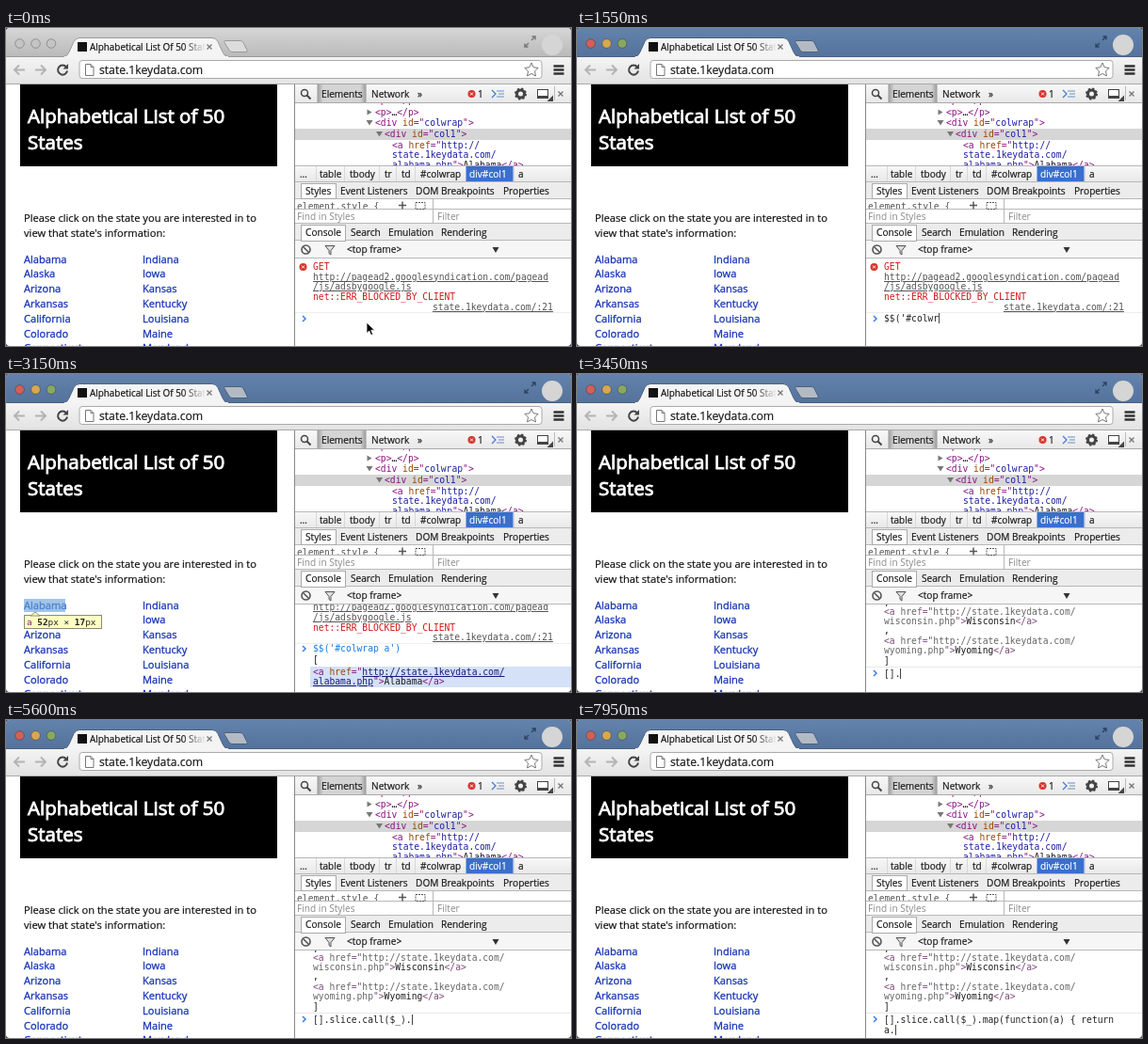
These frames come from a looping animation (600 px wide and 338 px high, 8000 ms). An HTML page:

```html
<!DOCTYPE html>
<html lang="en">
<head>
<meta charset="utf-8">
<title>Console typing</title>
<style>
html, body { margin: 0; width: 100%; height: 100%; overflow: hidden; background: #444; }
#stage {
  --strip1: #d6d6d6; --strip2: #b9b9b9; --bar1: #f4f4f4; --bar2: #e4e4e4; --edge: #999;
  --red: #c4c4c4; --yellow: #c4c4c4; --green: #c4c4c4; --newtab: #dcdcdc; --arrows: #777;
  position: absolute; left: 0; top: 0; width: 600px; height: 338px;
  overflow: hidden; border-radius: 4px; background: #fff;
  font: 10.15px "Open Sans", "Noto Sans", sans-serif; color: #1a1a1a;
  -webkit-text-stroke: .2px;
}
#stage.active {
  --strip1: #6383ad; --strip2: #54729a; --bar1: #f4f4f4; --bar2: #e2e2e2; --edge: #4a617f;
  --red: #d0605a; --yellow: #d6a850; --green: #88a862; --newtab: #b4bac4; --arrows: #2d4260;
}
svg { position: absolute; left: 0; top: 0; }
.txt { position: absolute; line-height: 20px; white-space: pre; }
.url { font-size: 12.2px; }
.title { font-size: 9.9px; width: 123px; overflow: hidden; color: #111;
  -webkit-mask-image: linear-gradient(90deg, #000 80%, transparent);
  mask-image: linear-gradient(90deg, #000 80%, transparent); }
.head { font-size: 20.5px; color: #fff; -webkit-text-stroke: .9px #fff; }
.para { font-size: 11.15px; color: #111; }
.link { font-size: 11.1px; color: #1634b4; -webkit-text-stroke-width: .3px; }
.crumb { font-size: 10px; }
.white { color: #fff; }
.hint { color: #8a8a8a; -webkit-text-stroke-width: 0; }
.mono, .tip { font: 9.66px/20px "DejaVu Sans Mono", "Liberation Mono", monospace; -webkit-text-stroke-width: 0; }
.tip { font-size: 9.4px; color: #222; }
.clip { position: absolute; left: 307px; width: 293px; overflow: hidden; }
.layer { position: absolute; left: -307px; width: 600px; height: 338px; }
.err { color: #d01818; }
.src { color: #555; text-decoration: underline; }
.cmd { color: #1a78e0; }
.grey { color: #555; }
.t { color: #881280; }
.n { color: #994500; }
.v { color: #1f1fa4; }
#last .t { color: #7a4a78; }
#last .n, #last .v { color: #666; }
.hover .v { color: #1a1a7a; text-decoration: underline; }
.row { position: absolute; background: #d4e1f7; }
#input { white-space: pre-wrap; width: 252px; line-height: 11px; left: 326px; color: #222; }
#caret { border-left: 1px solid #444; margin: 0 -1px 0 0; }
</style>
</head>
<body>
<div id="stage">
  <svg id="back" width="600" height="338">
    <defs>
      <linearGradient id="strip" x2="0" y2="1"><stop style="stop-color:var(--strip1)"/><stop offset="1" style="stop-color:var(--strip2)"/></linearGradient>
      <linearGradient id="bar" x2="0" y2="1"><stop style="stop-color:var(--bar1)"/><stop offset="1" style="stop-color:var(--bar2)"/></linearGradient>
      <linearGradient id="tool" x2="0" y2="1"><stop stop-color="#f8f8f8"/><stop offset="1" stop-color="#e8e8e8"/></linearGradient>
      <linearGradient id="picked"><stop stop-color="#999"/><stop offset=".12" stop-color="#d4d4d4"/><stop offset=".88" stop-color="#d4d4d4"/><stop offset="1" stop-color="#999"/></linearGradient>
    </defs>

    <!-- window frame -->
    <rect width="600" height="31" fill="url(#strip)"/>
    <circle cx="14.500" cy="16.500" r="4.800" style="fill:var(--red)" stroke="#0004"/>
    <circle cx="31.500" cy="16.500" r="4.800" style="fill:var(--yellow)" stroke="#0004"/>
    <circle cx="48" cy="16.500" r="4.800" style="fill:var(--green)" stroke="#0004"/>
    <path d="M233 13.500h16q2 0 3 2l4 8q1 2-1 2h-15q-2 0-3-2l-5-8q-1-2 1-2z" style="fill:var(--newtab);stroke:var(--edge)"/>
    <rect y="30" width="600" height="30" fill="url(#bar)"/>
    <path d="M0 30.500H61q4 0 6-5l5-11q2-4 6-4h141q4 0 6 4l5 11q2 5 6 5H600" style="fill:var(--bar1);stroke:var(--edge)"/>
    <rect x="62" y="30" width="174" height="2" style="fill:var(--bar1)"/>
    <rect x="76" y="15" width="10" height="10" fill="#111"/>
    <path d="M213.500 17.500l5 5m0-5l-5 5" stroke="#777" stroke-width="1.300"/>
    <path d="M558 13l4-4m-3.500 0h3.500v3.500M555 16l-4 4m0-3.500v3.500h3.500" fill="none" style="stroke:var(--arrows)" stroke-width="1.400"/>
    <circle cx="580" cy="18" r="11" fill="#d5d5d5"/>

    <!-- address bar -->
    <rect y="59" width="600" height="1" fill="#aaa"/>
    <path d="M20 44.500H9m5-5l-5 5 5 5M31 44.500h11m-5-5l5 5-5 5" fill="none" stroke="#b4b4b4" stroke-width="2"/>
    <path d="M64 41.500a5 5 0 1 0 1 4" fill="none" stroke="#444" stroke-width="2"/>
    <path d="M66 38v5.500h-5.500z" fill="#444"/>
    <rect x="78" y="34.500" width="491" height="19" rx="3" fill="#fff" stroke="#aaa"/>
    <path d="M84.500 38.500h5.500l3 3v9h-8.500zM90 38.500v3h3" fill="#fff" stroke="#777"/>
    <path d="M558 37l2.200 4.800 5 .600-3.700 3.500 1 5.100-4.500-2.500-4.500 2.500 1-5.100-3.700-3.500 5-.600z" fill="#fff" stroke="#777"/>
    <path d="M581.500 40.500h11m-11 4h11m-11 4h11" stroke="#333" stroke-width="2.300"/>

    <!-- page -->
    <rect x="15" y="60" width="273" height="87"/>

    <!-- inspector -->
    <rect x="306" y="60" width="1" height="278" fill="#888"/>
    <rect x="307" y="60" width="293" height="19" fill="url(#tool)"/>
    <rect x="330.500" y="60" width="52" height="19" fill="url(#picked)"/>
    <rect x="307" y="79" width="293" height="1" fill="#aaa"/>
    <circle cx="317" cy="69" r="3.500" fill="none" stroke="#444" stroke-width="1.500"/>
    <path d="M319.500 71.500l4 4" stroke="#444" stroke-width="2"/>
    <circle cx="494.500" cy="70" r="4" fill="#d8322c"/>
    <path d="M493 68.500l3 3m0-3l-3 3" stroke="#fff"/>
    <path d="M516 66l4 4-4 4" fill="none" stroke="#4a7ccc" stroke-width="1.300"/>
    <path d="M521 67h8m-6 3h6m-8 3h8" stroke="#6b8fc4" stroke-width="1.200"/>
    <circle cx="546.500" cy="70" r="4" fill="none" stroke="#444" stroke-width="3"/>
    <circle cx="546.500" cy="70" r="5.500" fill="none" stroke="#444" stroke-width="2" stroke-dasharray="2.160"/>
    <rect x="564.500" y="65.500" width="11" height="9" fill="#fff" stroke="#444"/>
    <path d="M564 73h12M577 77h3v-3z" stroke="#444" stroke-width="2"/>
    <path d="M582.500 62v15" stroke="#bbb"/>
    <path d="M586.500 67.500l5 5m0-5l-5 5" stroke="#777" stroke-width="1.400"/>

    <rect x="307" y="146" width="293" height="18" fill="url(#tool)"/>
    <rect x="307" y="164" width="293" height="17" fill="#ececec"/>
    <rect x="307" y="208" width="293" height="18" fill="#ececec"/>
    <rect x="307" y="226" width="293" height="18" fill="#f6f6f6"/>
    <path d="M307 146.500h293M307 163.500h293M307 181.500h293M307 192.500h293M307 207.500h293M307 225.500h293M307 244.500h293M453.500 182v25" stroke="#b8b8b8"/>
    <path d="M329.500 147v16m30-16v16m37-16v16m18-16v16m20-16v16m105-16v16" stroke="#d8d8d8"/>
    <rect x="488.500" y="147" width="50" height="16" fill="#3a6fcd"/>
    <rect x="313.500" y="165.500" width="37" height="16" fill="#fff" stroke="#aaa"/>
    <rect x="313.500" y="209.500" width="47" height="17" fill="#fff" stroke="#aaa"/>
    <path d="M417 188.500h8m-4-4v8" stroke="#555" stroke-width="1.500"/>
    <rect x="435" y="185.500" width="10" height="7" fill="none" stroke="#555" stroke-dasharray="2 1"/>
    <circle cx="318.500" cy="235.500" r="4.500" fill="none" stroke="#555" stroke-width="1.600"/>
    <path d="M315.500 232.500l6 6" stroke="#555" stroke-width="1.600"/>
    <path d="M339 231.500h10l-4 5v4.500l-2-1.500v-3z" fill="#ddd" stroke="#555"/>
    <path d="M516.500 233h7l-3.500 6z" fill="#333"/>
  </svg>
  <div id="labels"></div>
  <div class="clip" style="top:182px;height:10px"><div class="layer" id="styles" style="top:-182px"></div></div>
  <div class="clip" style="top:80px;height:66px"><div class="layer" id="tree" style="top:-80px">
    <div class="row" style="left:307px;top:107px;width:293px;height:11.5px;background:#d6d6d6"></div>
    <svg width="600" height="338"><path d="M383.500 86.500v6l5-3zM382.500 98h7l-3.500 5.500zM393 110h7l-3.500 5.500z" fill="#777"/></svg>
  </div></div>
  <div class="clip" style="top:245px;height:93px"><div class="layer" style="top:-245px">
    <div id="error" class="layer" style="left:0"></div>
    <div id="first" class="layer hover" style="left:0;top:0"></div>
    <div id="last" class="layer" style="left:0;top:0"></div>
    <svg id="prompt" width="12" height="12" style="left:313px"><path d="M2 3l3 3-3 3" fill="none" stroke="#3f7fe0" stroke-width="1.500"/></svg>
    <div id="input" class="txt mono"><span id="typed"></span><span id="caret"></span></div>
  </div></div>
  <div id="highlight">
    <svg width="310" height="338">
      <rect x="19" y="239" width="44" height="14" fill="#6fa8dc" fill-opacity=".66"/>
      <rect x="19.500" y="256.500" width="82" height="14" fill="#ffffc2" stroke="#8a8a7a"/>
      <path d="M26 257l5-4 5 4z" fill="#ffffc2" stroke="#8a8a7a"/>
    </svg>
  </div>
  <svg id="mouse" width="14" height="18"><path d="M1 1v11.500l2.700-2.500 2 4.500 2-.900-2-4.400H9.500z" stroke="#fff" stroke-width=".8"/></svg>
</div>
<script>
const $ = id => document.getElementById(id);

// Places one line of text, vertically centred on y.
function put(parent, x, y, html, cls = '') {
  const el = document.createElement('div');
  el.className = 'txt ' + cls;
  el.style.left = x + 'px';
  el.style.top = y - 10 + 'px';
  el.innerHTML = html;
  $(parent).append(el);
}
const label = (...args) => put('labels', ...args);
const span = (cls, text) => `<span class="${cls}">${text}</span>`;
const openDiv = id => span('t', '&lt;div ') + span('n', 'id') + span('t', '="') + span('v', id) + span('t', '"&gt;');
const openLink = text => span('t', '&lt;a ') + span('n', 'href') + span('t', '="') + span('v', text);
const endLink = (file, name) => span('v', file) + span('t', '"&gt;') + name + span('t', '&lt;/a&gt;');

label(89, 20, 'Alphabetical List Of 50 States', 'title');
label(99, 44.5, 'state.1keydata.com', 'url');
label(23, 93, 'Alphabetical List of 50', 'head');
label(23, 120.5, 'States', 'head');
label(19, 202, 'Please click on the state you are interested in to', 'para');
label(19, 218, "view that state's information:", 'para');

const columns = [
  [19, 'Alabama Alaska Arizona Arkansas California Colorado Connecticut'],
  [145, 'Indiana Iowa Kansas Kentucky Louisiana Maine Maryland']
];
for (const [x, names] of columns)
  names.split(' ').forEach((name, i) => label(x, 245.5 + i * 15.8, name, 'link'));

const rows = [
  [70, '', [335, 'Elements'], [388, 'Network'], [437, '»'], [501, '1']],
  [155, 'crumb', [312, '…'], [333, 'table'], [365, 'tbody'], [402, 'tr'], [420, 'td'], [440, '#colwrap'], [544, 'a']],
  [155, 'white', [492, 'div#col1']],
  [173, '', [318, 'Styles'], [355, 'Event Listeners'], [435, 'DOM Breakpoints'], [528, 'Properties']],
  [199.5, 'hint', [309, 'Find in Styles'], [458, 'Filter']],
  [217, '', [318, 'Console'], [366, 'Search'], [406, 'Emulation'], [462, 'Rendering']],
  [235, '', [362, '&lt;top frame&gt;']]
];
for (const [y, cls, ...items] of rows)
  for (const [x, text] of items) label(x, y, text, cls);
put('styles', 309, 189.5, 'element.style {', 'mono grey');

const para = span('t', '&lt;p&gt;') + '…' + span('t', '&lt;/p&gt;');
put('tree', 392, 76.5, para, 'mono');
put('tree', 392, 90, para, 'mono');
put('tree', 392, 101, openDiv('colwrap'), 'mono');
put('tree', 402, 113, openDiv('col1'), 'mono');
put('tree', 410, 124.5, openLink('http://'), 'mono');
put('tree', 410, 135, span('v', 'state.1keydata.com/'), 'mono');
put('tree', 410, 146, endLink('alabama.php', 'Alabama'), 'mono');

$('error').innerHTML = '<svg width="600" height="338"><circle cx="315.500" cy="254" r="4" fill="#d8322c"/>' +
  '<path d="M314 252.500l3 3m0-3l-3 3" stroke="#fff"/><path d="M307 302.500h293" stroke="#eee"/></svg>';
put('error', 326, 253.5, 'GET', 'mono err');
put('error', 326, 264.5, 'http://pagead2.googlesyndication.com/pagead', 'mono src');
put('error', 326, 275, '/js/adsbygoogle.js', 'mono src');
put('error', 326, 286, 'net::ERR_BLOCKED_BY_CLIENT', 'mono err');
put('error', 453, 296.5, 'state.1keydata.com/:21', 'mono src');

const query = "$$('#colwrap a')";
const call = '[].slice.call($_).map(function(a) { return a.';

$('first').innerHTML = '<div class="row" id="row" style="left:323px;top:311px;width:277px;height:22px"></div>';
put('first', 326, 292, query, 'mono cmd');
put('first', 326, 303.5, '[', 'mono');
put('first', 326, 316.5, openLink('http://state.1keydata.com/'), 'mono');
put('first', 326, 327, endLink('alabama.php', 'Alabama'), 'mono');

$('last').innerHTML = '<svg width="600" height="338"><path d="M307 311.500h293" stroke="#e8e8e8"/></svg>';
put('last', 326, 243, ',', 'mono');
put('last', 326, 273, ',', 'mono');
put('last', 326, 304.5, ']', 'mono');
[['wisconsin', 'Wisconsin', 252.5], ['wyoming', 'Wyoming', 284]].forEach(([file, name, y]) => {
  put('last', 326, y, openLink('http://state.1keydata.com/'), 'mono');
  put('last', 326, y + 10, endLink(file + '.php', name), 'mono');
});
put('highlight', 22, 264, span('t', 'a') + ' <b>52</b>px × <b>17</b>px', 'tip');

// Moments at which each further character appears.
const queryKeys = [850, 900, 1100, 1150, 1200, 1250, 1350, 1400, 1450, 1550, 1600, 1700, 1800, 2000, 2100, 2150];
const callKeys = [
  3350, 3400, 3450, 3600, 3650, 3700, 3800, 3850, 3900, 4000, 4050, 4100, 4200,
  4500, 4950, 5050, 5250, 5550, 5800, 5900, 6050, 6250,
  6400, 6450, 6500, 6550, 6600, 6600, 6650, 6700, 6850, 7050,
  7150, 7200, 7250, 7300, 7350, 7400, 7450, 7500, 7600, 7650, 7700, 7750, 7900
];
const between = (t, a, b) => t >= a && t < b;
const show = (id, on) => { $(id).style.display = on ? '' : 'none'; };

function render(t) {
  const output = t >= 2550, calling = t >= 3350;
  const keys = calling ? callKeys : queryKeys;
  const count = keys.filter(k => k <= t).length;
  const y = calling ? 318 : 308.5;

  $('stage').classList.toggle('active', t >= 350);
  show('error', !calling);
  $('error').style.top = output ? '-16.5px' : '0';
  show('first', output && !calling);
  show('last', calling);
  show('highlight', between(t, 2700, 3350));
  show('row', between(t, 2700, 3350));

  const prompting = !output || calling;
  $('typed').textContent = prompting ? (calling ? call : query).slice(0, count) : '';
  $('input').style.top = y - 5.5 + 'px';
  $('prompt').style.top = (prompting ? y : 292) - 6 + 'px';
  show('caret', between(t, 850, 2200) || (calling && !between(t, 4600, 4750)));

  const p = Math.min(1, Math.max(0, t / 600));
  const ease = p * p * (3 - 2 * p);
  $('mouse').style.left = 382 + 14 * ease + 'px';
  $('mouse').style.top = 311.5 + 4 * ease + 'px';
  show('mouse', t < 850);
}

const start = performance.now();
function tick() {
  render((performance.now() - start) % 8000);
  requestAnimationFrame(tick);
}
render(0);
requestAnimationFrame(tick);
</script>
</body>
</html>
```
